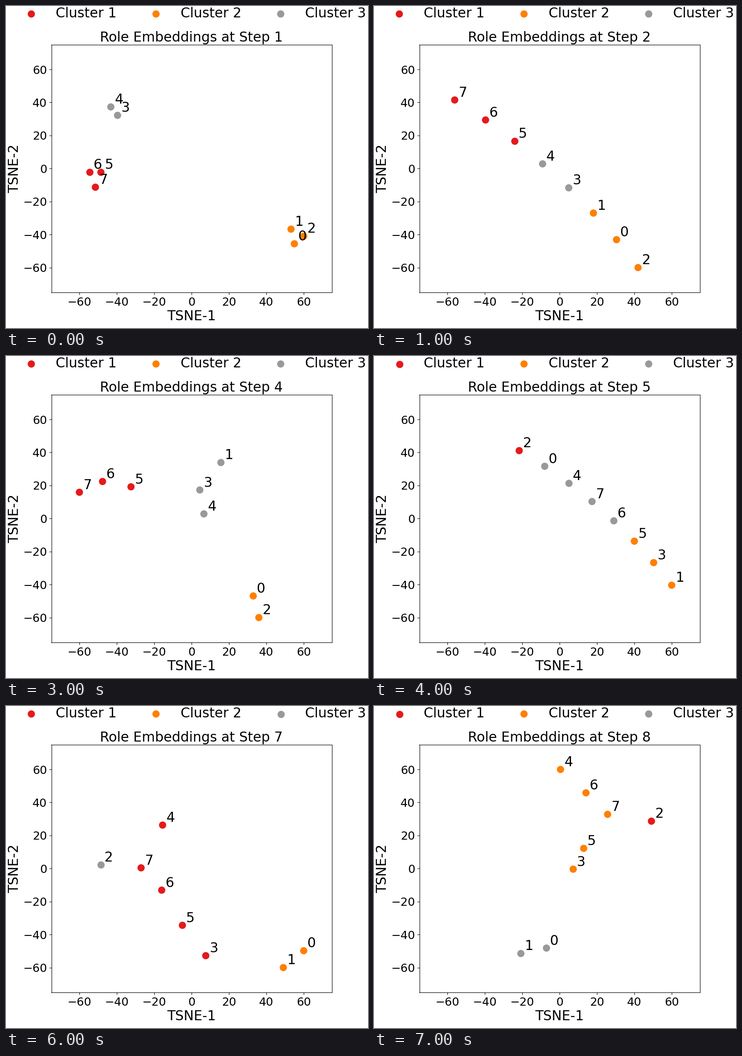
Recreate the animation shown at these times as a matplotlib script. Size 794 px wide and 706 px high, loop 8 s.

```python
import matplotlib.pyplot as plt
import numpy as np
from matplotlib.animation import FuncAnimation

W, H, DPI = 794, 706, 100
LEFT, RIGHT, TOP, BOTTOM = 99.5, 714.5, 84.8, 627.8
BIG, SMALL, DOT = 21.3, 18, 108
COLORS = ["#e41a1c", "#ff7f00", "#999999"]


def chain(roles, start, end=0, bend=0):
    """Space roles evenly along a parabola; bend is relative to the chord."""
    t = np.linspace(0, 1, len(roles))
    chord = end - start
    spots = start + chord * t + 4 * t * (1 - t) * bend * 1j * chord
    return {int(r): (z.real, z.imag) for r, z in zip(roles, spots)}


# Per step: the cluster of roles 0 to 7, then the chains they form.
STEPS = [
    ("11122000", chain("675", -54.4 - 2.3j, -48.5 - 2.3j, -1.53),
     chain("012", 55 - 45.6j, 60 - 41j, 1.14 - 0.19j),
     chain("34", -39.6 + 32.2j, -43.2 + 37.3j)),
    ("11122000", chain("76543102", -56.1 + 41.5j, 42 - 60j, 0.05)),
    ("11122200", chain("021", -23.2 - 17.3j, -15.1 - 12.3j, 2.46 + 0.15j),
     chain("435", 9.5 - 27.8j, 29.4 - 38.5j, 0.08j),
     chain("67", 51.8 - 51.1j, 60 - 55.8j)),
    ("12122000", chain("765", -60 + 15.9j, -32.4 + 19.2j, 0.18 + 0.03j),
     chain("134", 15.7 + 33.9j, 6.6 + 2.8j, -0.19 - 0.09j),
     chain("02", 33 - 46.9j, 36 - 60j)),
    ("21012122", chain("20476531", -21.6 + 41.3j, 60 - 40.4j, 0.05)),
    ("21012122", chain("204", -34.1 + 46.6j, -2.6 + 27.8j, -0.01 - 0.04j),
     chain("765", 9.3 + 9.3j, 26.8 - 18.5j),
     chain("31", 38.3 - 38.4j, 46.1 - 52.9j)),
    ("11200000", chain("765", -27 + 0.4j, -4.9 - 34.4j, 0.05 + 0.08j),
     chain("34", 7.6 - 52.8j, -15.5 + 26.3j),
     chain("01", 60 - 49.8j, 49.1 - 60j), chain("2", -48.5 + 2.2j)),
    ("22011111", chain("467", 0.5 + 60j, 25.7 + 32.8j, 0.01 - 0.03j),
     chain("53", 12.9 + 12.2j, 7.3 - 0.4j),
     chain("10", -20.7 - 51.5j, -7 - 48.2j), chain("2", 49.1 + 28.8j)),
]

plt.rcParams["font.family"] = "DejaVu Sans"
fig = plt.figure(figsize=(W / DPI, H / DPI), dpi=DPI, facecolor="white")
ax = fig.add_axes([LEFT / W, 1 - BOTTOM / H,
                   (RIGHT - LEFT) / W, (BOTTOM - TOP) / H])
ax.set(xlim=(-75, 75), ylim=(-75, 75))
ax.set_xticks(range(-60, 61, 20))
ax.set_yticks(range(-60, 61, 20))
ax.tick_params(labelsize=SMALL)
ax.set_xlabel("TSNE-1", fontsize=BIG, labelpad=3)
ax.set_ylabel("TSNE-2", fontsize=BIG, labelpad=3)
title = ax.set_title("", fontsize=BIG, pad=5)

# The legend lives on a layer measured in pixels from the top left.
layer = fig.add_axes([0, 0, 1, 1])
layer.set(xlim=(0, W), ylim=(H, 0))
layer.axis("off")
legend_x = 55.55 + 273.5 * np.arange(3)
for k, x in enumerate(legend_x):
    layer.text(x + 53.5, 25.3, f"Cluster {k + 1}", fontsize=BIG)

drawn = []


def update(i):
    while drawn:
        drawn.pop().remove()
    clusters, *chains = STEPS[i]
    spots = {role: p for c in chains for role, p in c.items()}
    title.set_text(f"Role Embeddings at Step {i + 1}")
    for k, color in enumerate(COLORS):
        members = [p for role, p in spots.items() if clusters[role] == str(k)]
        # One colour per member: a lone member gets a pixel-snapped marker.
        shades = [color] * len(members)
        drawn.append(ax.scatter(*zip(*members), s=DOT, c=shades))
        key = layer.scatter(legend_x[k], 17.5, s=DOT)
        key.set_color(shades)
        drawn.append(key)
    for role, (x, y) in spots.items():
        drawn.append(ax.text(x + 2, y + 2, str(role), fontsize=BIG))
    return drawn


anim = FuncAnimation(fig, update, frames=len(STEPS), interval=1000,
                     init_func=lambda: update(0), repeat=True, repeat_delay=0)
plt.show()
```
